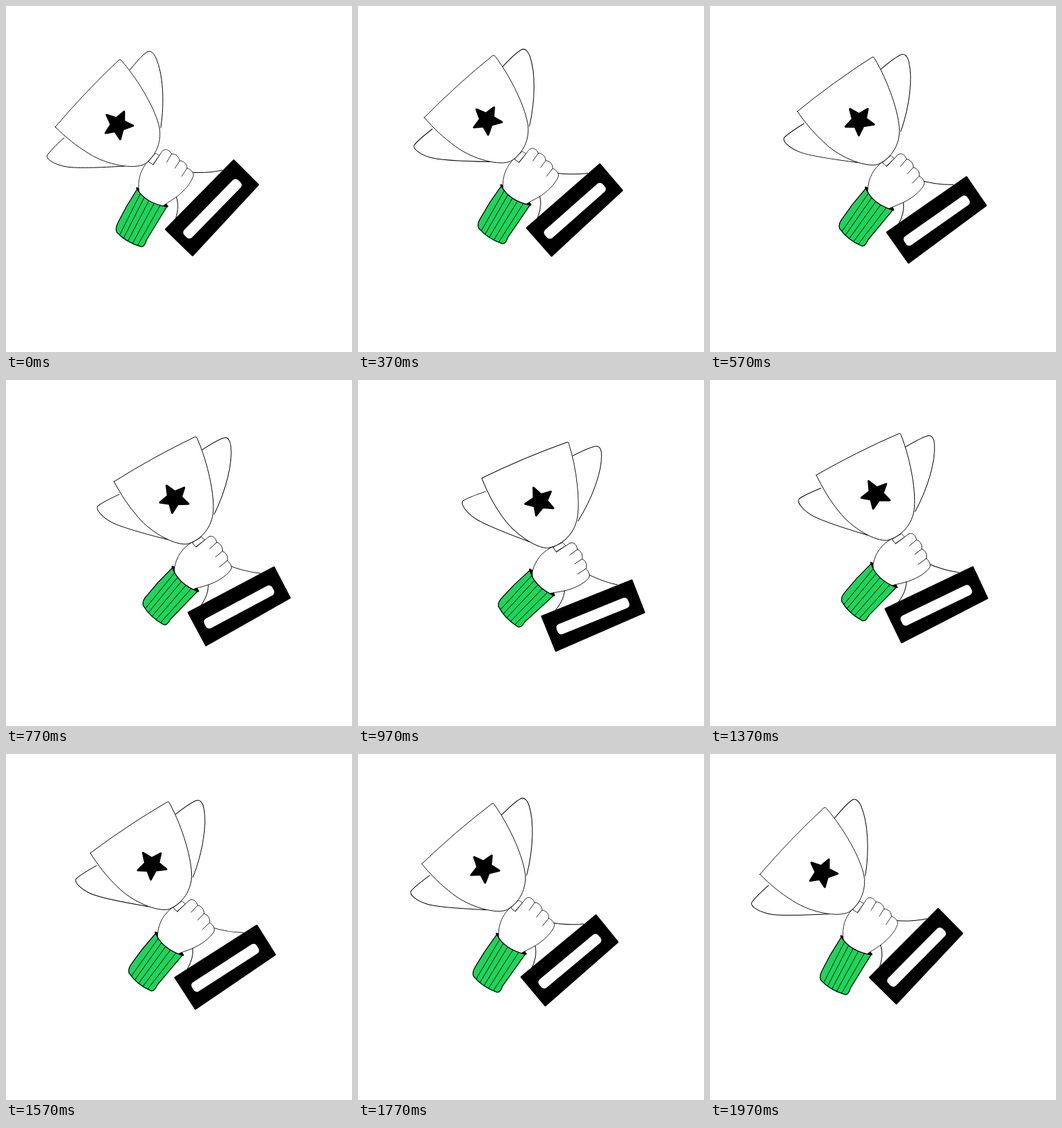
Write an HTML page with a canvas that moves like this. It is 512 px wide and 512 px high and loops after 2 s.

```html
<!DOCTYPE html>
<html lang="en">
<head>
<meta charset="utf-8">
<title>Raised trophy</title>
<style>
html, body { margin: 0; width: 100%; height: 100%; overflow: hidden; background: #fff; }
canvas { display: block; }
</style>
</head>
<body>
<canvas id="stage" width="512" height="512"></canvas>
<script>
const ctx = document.getElementById('stage').getContext('2d');
const STEPS = 60, LOOP = 2000;
const GREEN = '#1dd55a';

// Poses over one loop: step, centre x, centre y, turn in degrees
const trophyKeys = [
  [0, 244, 241.5, 0], [11, 264, 240.2, 4.3], [17, 285.8, 248.8, 10.6],
  [23, 304, 261.5, 17.6], [30, 315.2, 271.6, 24.2], [35, 312, 268.7, 24.6],
  [47, 277.5, 245.7, 12.9]
];
const cuffKeys = [
  [0, 199.2, 314.2, 0], [11, 214.8, 309.8, 3.1], [17, 229.5, 313.5, 8.2],
  [23, 241.8, 321, 12.8], [30, 247.5, 324.8, 16.2], [35, 245, 322.2, 15.8],
  [47, 220, 309, 8.8]
];

function keyAt(keys, i) {
  const n = keys.length, turn = Math.floor(i / n);
  const [step, ...pose] = keys[i - turn * n];
  return [step + turn * STEPS, ...pose];
}

function slope(a, b, c, k) {
  const h1 = b[0] - a[0], h2 = c[0] - b[0];
  return ((b[k] - a[k]) / h1 * h2 + (c[k] - b[k]) / h2 * h1) / (h1 + h2);
}

// Periodic Hermite curve through the poses
function poseAt(keys, step) {
  let i = 0;
  while (keyAt(keys, i + 1)[0] <= step) i++;
  const [a, b, c, d] = [-1, 0, 1, 2].map(o => keyAt(keys, i + o));
  const h = c[0] - b[0], u = (step - b[0]) / h, v = 1 - u;
  return [1, 2, 3].map(k =>
    b[k] * v * v * (1 + 2 * u) + c[k] * u * u * (1 + 2 * v) +
    h * u * v * (v * slope(a, b, c, k) - u * slope(b, c, d, k)));
}

function posed(keys, step, draw) {
  const [x, y, deg] = poseAt(keys, step);
  ctx.save();
  ctx.translate(x, y);
  ctx.rotate(deg * Math.PI / 180);
  ctx.translate(-keys[0][1], -keys[0][2]);
  draw();
  ctx.restore();
}

function shape(path, fill, width = 1) {
  if (fill) {
    ctx.fillStyle = fill;
    ctx.fill(path);
  }
  if (width) {
    ctx.lineWidth = width;
    ctx.strokeStyle = '#000';
    ctx.stroke(path);
  }
}

// Star around (x, y); each notch lies between two neighbouring tips
function starPath(x, y, tips, notch) {
  const p = new Path2D();
  tips.forEach(([tx, ty], i) => {
    const [nx, ny] = tips[(i + 1) % tips.length];
    p.lineTo(x + tx, y + ty);
    p.lineTo(x + (tx + nx) * notch, y + (ty + ny) * notch);
  });
  p.closePath();
  return p;
}

function quadPoint(p, c, q, t) {
  const s = 1 - t;
  return [0, 1].map(k => s * s * p[k] + 2 * s * t * c[k] + t * t * q[k]);
}

const handles = new Path2D(
  'M183 95C192 84 202 72 209 68C214 65 219 70 222 77C232 100 235 140 229 180' +
  'M86 195C75 205 64 216 61 221C59 227 72 234 85 237C100 241 140 239 175 237');
const cup = new Path2D(
  'M73 179Q118 126 167 80Q169 78 171 81C198 112 222 155 227 180C231 205 219 224 205 234' +
  'C190 242 150 236 122 218C104 207 88 194 73 179Z');
const star = starPath(165.5, 176,
  [[9.2, -19.7], [22.4, 1.2], [3.5, 21.2], [-18.2, 12], [-16.6, -14.8]], 0.29);
const stem = new Path2D('M270 246C284 247 302 247 320 243M250 278C256 289 255 302 251 315');
const base = new Path2D('M337 228.5L373 264.5L276 369L236.5 330.5Z');
const band = new Path2D('M211 230L221 218L227 221L217 235Z');
const hand = new Path2D(
  'M197 275C194 256 200 241 210 230L218 235L229 218C232 211 240 210 245 219' +
  'C249 218 256 222 257 229C262 229 268 233 268 240C272 241 279 246 277 252' +
  'C274 262 262 276 250 284C243 289 237 292 231 297L222 306L204 292Z');
const fingers = new Path2D('M245 219L238 231M257 229L250 240M268 240L260 252');
const opening = new Path2D('M193.5 269.5Q223 276 239 296.5Q207 292 193.5 269.5Z');
const cuff = new Path2D(
  'M194 271Q207 292 238 297L208 346Q205 357 200 356Q178 350 164 335' +
  'Q161 329 166 320L178 297Z');
const ribs = new Path2D();
for (let i = 1; i < 6; i++) {
  ribs.moveTo(...quadPoint([194, 271], [207, 292], [238, 297], i / 6));
  ribs.lineTo(...quadPoint([163, 333], [178, 351], [203, 356], i / 6));
}

function drawSlot() {
  ctx.save();
  ctx.translate(305.5, 300);
  ctx.rotate(-45.7 * Math.PI / 180);
  const p = new Path2D();
  p.roundRect(-57, -8, 114, 16, 5.5);
  shape(p, '#fff', 0);
  ctx.restore();
}

function drawTrophy() {
  shape(handles);
  shape(stem);
  shape(base, '#000', 2.6);
  drawSlot();
  shape(cup, '#fff', 0.9);
  shape(star, '#000', 3);
  shape(band, '#fff', 0.7);
}

function drawHand() {
  shape(hand, '#fff', 0.8);
  shape(fingers, null, 0.8);
}

function drawCuff() {
  shape(cuff, GREEN, 1.3);
  shape(ribs, null, 0.9);
}

function render(time) {
  const step = Math.floor((time + 3.4) * STEPS / LOOP) % STEPS;
  ctx.fillStyle = '#fff';
  ctx.fillRect(0, 0, 512, 512);
  ctx.lineJoin = ctx.lineCap = 'round';
  posed(trophyKeys, step, drawTrophy);
  posed(cuffKeys, step, () => shape(opening, '#000', 2.4));
  posed(trophyKeys, step, drawHand);
  posed(cuffKeys, step, drawCuff);
}

const start = performance.now();
function tick() {
  render(performance.now() - start);
  requestAnimationFrame(tick);
}
tick();
</script>
</body>
</html>
```
